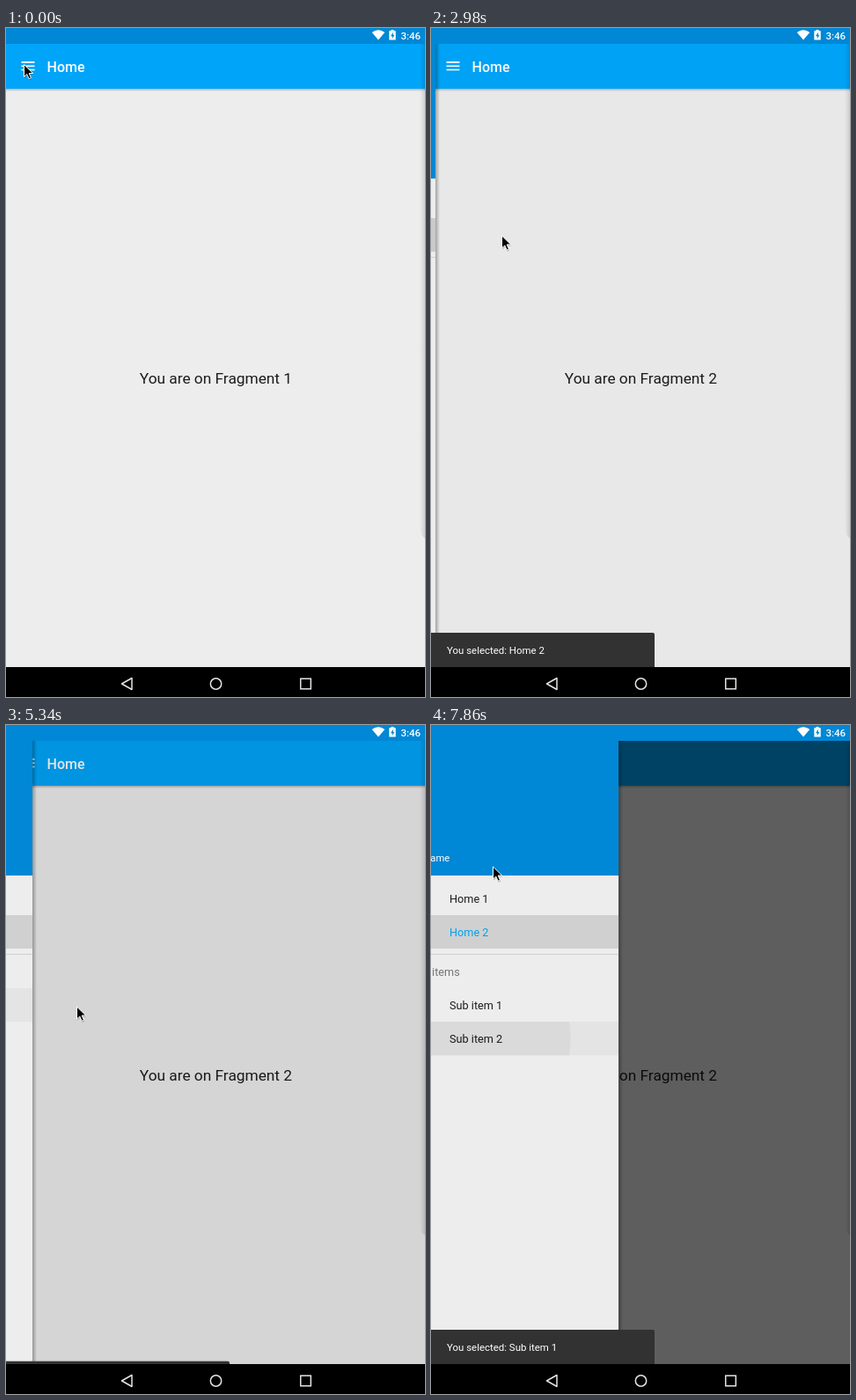
These frames come from a looping animation (476x760 px, 8 s). An HTML page:

```html
<!DOCTYPE html>
<html lang="en">
<head>
<meta charset="utf-8">
<title>Navigation drawer</title>
<style>
  html, body { margin: 0; width: 100%; height: 100%; overflow: hidden; background: #000; }
  svg { display: block; }
  text { font-family: Roboto, sans-serif; white-space: pre; }
  .item { font-size: 12.7px; fill: #1c1c1c; }
  .icon { fill: #9b9b9b; }
  .selected .item { fill: #03a0ee; }
  .selected .icon { fill: #4db4e6; }
  .highlight { fill: none; }
  .selected .highlight { fill: #d0d0d0; }
</style>
</head>
<body>
<svg width="100%" height="100%" viewBox="0 0 476 760">
  <defs>
    <linearGradient id="fadeRight">
      <stop offset="0" stop-opacity=".3"/><stop offset="1" stop-opacity="0"/>
    </linearGradient>
    <linearGradient id="fadeLeft">
      <stop offset="0" stop-opacity="0"/><stop offset="1" stop-opacity=".13"/>
    </linearGradient>
    <linearGradient id="fadeDown" x2="0" y2="1">
      <stop offset="0" stop-opacity=".25"/><stop offset="1" stop-opacity="0"/>
    </linearGradient>
    <path id="house" transform="scale(.65)" d="M10 20v-6h4v6h5v-8h3L12 3 2 12h3v8z"/>
  </defs>

  <!-- Page -->
  <rect y="18" width="476" height="708" fill="#ededed"/>
  <text id="fragment" x="151.8" y="404" font-size="17.3" fill="#1c1c1c"></text>
  <rect y="18" width="476" height="51" fill="#00a5fa"/>
  <rect y="69" width="476" height="3" fill="url(#fadeDown)"/>
  <path d="M17.5 38.9h15M17.5 43.2h15M17.5 47.5h15" stroke="#fff" stroke-width="1.6"/>
  <text x="46.5" y="50" font-size="16" font-weight="500" fill="#fff">Home</text>
  <path d="M470 18h6v562q-6-4-6-14z" fill="url(#fadeLeft)"/>
  <rect id="scrim" y="18" width="476" height="708"/>

  <!-- Drawer -->
  <g id="drawer">
    <rect id="drawerShadow" x="254" y="18" width="5" height="708" fill="url(#fadeRight)"/>
    <rect width="254" height="726" fill="#ededed"/>
    <rect width="254" height="171" fill="#0087d5"/>
    <text x="11" y="155" font-size="11.3" fill="#fff">Username</text>
    <g id="items"></g>
    <rect y="260" width="254" height="1" fill="#d0d0d0"/>
    <text x="17.3" y="285" font-size="12.7" fill="#757575">Sub items</text>
    <svg id="ripple" width="254" height="38.5">
      <rect id="press" width="254" height="38.5"/>
      <circle id="wave" cx="80" cy="19"/>
    </svg>
  </g>

  <!-- Snackbar -->
  <g id="snackbar">
    <rect x="-4" y="687" width="258" height="41" rx="2" fill="#323232"/>
    <text id="message" x="18" y="711" font-size="11.45" fill="#fff"></text>
  </g>

  <!-- System bars -->
  <rect width="476" height="18" fill="#0087d5"/>
  <path d="M415.7 4.9Q423 -.6 430.3 4.9L423 13.6z" fill="#fff"/>
  <path d="M437.5 2h3v1.2h2.2v10.3h-7.4V3.2h2.2z" fill="#fff"/>
  <path d="M439.8 4.8l-2.8 4.4h1.7v3l2.6-4.3h-1.5z" fill="#0087d5"/>
  <text x="448.5" y="12.6" font-size="11.5" font-weight="500" fill="#fff">3:46</text>
  <rect y="726" width="476" height="34"/>
  <g fill="none" stroke="#e4e4e4" stroke-width="1.5">
    <path d="M143 738.5v13L131.5 745z" stroke-linejoin="round"/>
    <circle cx="238.5" cy="745" r="6.2"/>
    <rect x="334.7" y="739.2" width="11.6" height="11.6"/>
  </g>

  <!-- Pointer -->
  <g id="pointer">
    <circle id="touch" cx="2" cy="1" r="8.3" fill="#fff" fill-opacity=".32"/>
    <path d="M1 1.5v14l3.3-3 2.3 5.2 2.4-1-2.3-5.2h4.5z" opacity=".25"/>
    <path d="M.5 0v14l3.3-3 2.3 5.2 2.4-1-2.3-5.2h4.5z" stroke="#fff" stroke-width="1"/>
  </g>
</svg>

<script>
const $ = id => document.getElementById(id);
const clamp = x => Math.min(1, Math.max(0, x));
const settle = x => 1 - (1 - clamp(x)) ** 5;
const ease = x => 1 - (1 - clamp(x) ** 1.6) ** 3;

const LOOP = 8000, STEP = 148.1, PHASE = 895;
const DRAWER_WIDTH = 254;
const toggles = [1026, 2690, 4087, 5160, 6630, 7838];   // open, close, open, ...
const presses = [1000, 2660, 4060, 5130, 6620, 7760];
const rowOfPress = { 2660: 216, 5130: 299, 7760: 337 };
const pointerPath = [   // time, x, y
  [0, 20, 41.5], [1500, 20, 41.5], [1790, 24, 62], [2080, 24, 62], [2580, 80, 236],
  [2970, 80, 236], [3116, 25, 98], [3264, 25, 98], [3560, 22, 45], [4120, 22, 45],
  [4301, 32, 143], [4920, 80, 320], [5480, 80, 320], [6080, 22, 48], [6720, 22, 48],
  [7400, 78, 352], [7760, 78, 352], [7855, 70, 161], [LOOP, 70, 161]
];

const rows = [["Home 1", 178], ["Home 2", 216], ["Sub item 1", 299], ["Sub item 2", 337]];
$("items").innerHTML = rows.map(([label, y], i) => `
  <g transform="translate(0 ${y})">
    <rect class="highlight" width="254" height="38"/>
    ${i % 2 ? '<circle class="icon" cx="27.3" cy="19.3" r="6"/>'
            : '<use class="icon" href="#house" x="19.5" y="11.6"/>'}
    <text class="item" x="62" y="23.7">${label}</text>
  </g>`).join("");
const homeTwo = $("items").children[1];

function drawerAt(t) {
  const i = toggles.findLastIndex(start => start <= t);
  if (i < 0) return 0;
  const p = settle((t - toggles[i]) / 512);
  return i % 2 ? 1 - p : p;
}

function pointerAt(t) {
  const i = Math.max(1, pointerPath.findIndex(key => key[0] > t));
  const [t0, x0, y0] = pointerPath[i - 1], [t1, x1, y1] = pointerPath[i];
  const p = (t - t0) / (t1 - t0);
  return [x0 + (x1 - x0) * p, y0 + (y1 - y0) * p];
}

function drawRipple(t) {
  const press = presses.findLast(p => p <= t && p in rowOfPress);
  const age = t - press;
  const visible = age < 500;
  $("ripple").style.display = visible ? "" : "none";
  if (!visible) return;
  $("ripple").setAttribute("y", rowOfPress[press]);
  $("press").setAttribute("opacity", .04 * clamp(2 - age / 250));
  $("wave").setAttribute("r", age * 1.25);
  $("wave").setAttribute("opacity", .045 * clamp((200 - age) / 100));
}

function draw(t) {
  const open = drawerAt(t);
  $("drawer").setAttribute("transform", `translate(${(open - 1) * DRAWER_WIDTH} 0)`);
  $("drawerShadow").setAttribute("opacity", open > .005 ? 1 : 0);
  $("scrim").setAttribute("opacity", .6 * drawerAt(t - 25));

  homeTwo.classList.toggle("selected", t >= 2690);
  $("fragment").textContent = "You are on Fragment " + (t < 2690 ? 1 : 2);
  drawRipple(t);

  const shown = ease((t - 2690) / 250) - ease((t - 5176) / 250) + ease((t - 5426) / 250);
  $("snackbar").setAttribute("transform", `translate(0 ${(1 - shown) * 41})`);
  $("message").setAttribute("opacity", shown);
  $("message").textContent = "You selected: " + (t < 5426 ? "Home 2" : "Sub item 1");

  $("pointer").setAttribute("transform", `translate(${pointerAt(t)})`);
  const touching = presses.some(p => t > p - 80 && t < p + 60);
  $("touch").setAttribute("opacity", touching ? 1 : 0);
}

// The screen refreshes in even steps, as a low-rate screen capture does.
function tick(now) {
  const t = now % LOOP;
  draw(Math.max(0, PHASE + Math.floor((t - PHASE) / STEP) * STEP));
  requestAnimationFrame(tick);
}
draw(0);
requestAnimationFrame(tick);
</script>
</body>
</html>
```
